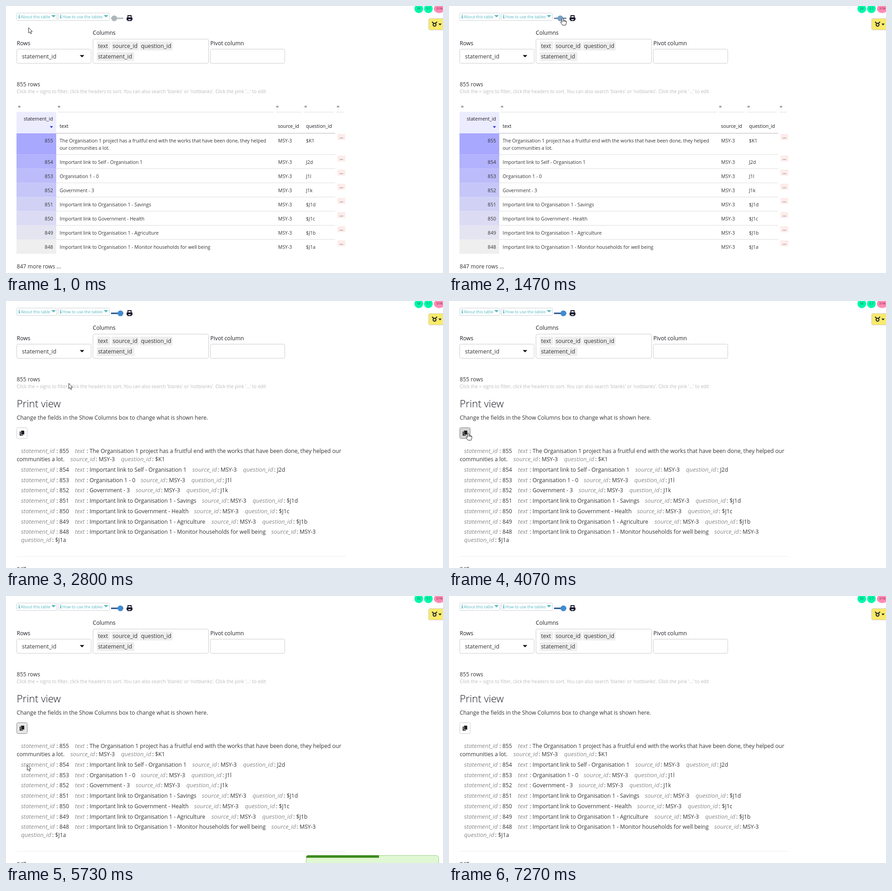
Recreate the animation shown at these times as an HTML page with a canvas. Size 957 px wide and 585 px high, loop 7.47 s.

```html
<!DOCTYPE html>
<html lang="en">
<head>
<meta charset="utf-8">
<title>Table print view</title>
<style>
html, body { margin: 0; width: 100%; height: 100%; overflow: hidden; background: #fff; }
canvas { display: block; }
</style>
</head>
<body>
<canvas id="stage" width="957" height="585"></canvas>
<script>
const ctx = document.getElementById('stage').getContext('2d');
const LOOP = 7470, STEP = 200 / 3;
const FAMILY = '"Open Sans", "Noto Sans", sans-serif';
const INK = '#343438', DARK = '#1e1e26', TEAL = '#55b9c3';

// id, text, question
const ROWS = [
  [855, 'The Organisation 1 project has a fruitful end with the works that have been done, they helped our communities a lot.', '$K1'],
  [854, 'Important link to Self - Organisation 1', 'J2d'],
  [853, 'Organisation 1 - 0', 'J1l'],
  [852, 'Government - 3', 'J1k'],
  [851, 'Important link to Organisation 1 - Savings', '$J1d'],
  [850, 'Important link to Government - Health', '$J1c'],
  [849, 'Important link to Organisation 1 - Agriculture', '$J1b'],
  [848, 'Important link to Organisation 1 - Monitor households for well being', '$J1a']
];
const SOURCE_X = [141, 408, 295, 284, 429, 412, 450, 581];

// time, x, y of the pointer tip
const PATH = [
  [0, 49, 47], [67, 50, 49], [200, 82, 112], [330, 150, 146], [470, 228, 128],
  [600, 260, 84], [730, 252, 46], [800, 248, 33], [930, 249, 26], [2000, 249, 26],
  [2130, 320, 45], [2270, 490, 90], [2400, 605, 145], [2530, 530, 177],
  [2670, 270, 179], [2800, 137, 180], [2930, 118, 195], [3130, 72, 246],
  [3330, 47, 281], [3530, 42, 289], [5400, 42, 289], [5600, 50, 330],
  [5800, 42, 390], [6000, 22, 446], [6200, 13, 482], [6330, 16, 505],
  [6530, 27, 538], [6730, 33, 567], [6900, 36, 592], [7470, 36, 600]
];

const clamp = v => Math.max(0, Math.min(1, v));
const mix = (a, b, p) => `rgb(${a.map((v, i) => Math.round(v + (b[i] - v) * p))})`;

function text(s, x, y, size, color = INK, style = '', align = 'left') {
  ctx.font = `${style} ${size}px ${FAMILY}`;
  ctx.fillStyle = color;
  ctx.textAlign = align;
  ctx.fillText(s, x, y);
}

function rect(x, y, w, h, color) {
  ctx.fillStyle = color;
  ctx.fillRect(x, y, w, h);
}

function box(x, y, w, h, r, fill, stroke) {
  ctx.beginPath();
  ctx.roundRect(x, y, w, h, r);
  if (fill) { ctx.fillStyle = fill; ctx.fill(); }
  if (stroke) { ctx.strokeStyle = stroke; ctx.lineWidth = 1; ctx.stroke(); }
}

function ellipse(x, y, rx, ry, color) {
  ctx.beginPath();
  ctx.ellipse(x, y, rx, ry, 0, 0, Math.PI * 2);
  ctx.fillStyle = color;
  ctx.fill();
}

function poly(points, fill, stroke) {
  ctx.beginPath();
  points.forEach(([x, y]) => ctx.lineTo(x, y));
  ctx.closePath();
  ctx.fillStyle = fill;
  ctx.fill();
  if (stroke) { ctx.strokeStyle = stroke; ctx.lineWidth = 1; ctx.stroke(); }
}

const caret = (x, y, w, h, color) => poly([[x - w / 2, y], [x + w / 2, y], [x, y + h]], color);

function infoTag(label, x, w) {
  box(x + .5, 15.5, w, 16, 2, '#fff', '#ccd2d4');
  rect(x + 5, 19, 2, 2, TEAL);
  rect(x + 4, 22, 3, 1, TEAL);
  rect(x + 5, 22, 2, 5, TEAL);
  rect(x + 4, 26, 4, 1, TEAL);
  text(label, x + 9.5, 27, 8.75, TEAL);
  caret(x + w - 7, 20, 10, 5, TEAL);
}

function chip(label, x, y, w) {
  box(x, y, w, 19.5, 2, '#eee');
  text(label, x + 2.5, y + 14, 12.3);
}

function printer(x, y) {
  box(x, y + 5, 13, 6, 1.5, '#1c1c30');
  rect(x + 2, y, 9, 6, '#1c1c30');
  rect(x + 4, y + 2, 5, 3, '#fff');
  rect(x + 2, y + 8, 9, 5, '#1c1c30');
  rect(x + 4, y + 9, 5, 2, '#fff');
}

function slider(p) {
  rect(230, 25.5, 27, 3, mix([178, 186, 192], [28, 78, 138], p));
  ellipse(237 + 13.5 * p, 27, 6.3, 6.3, mix([174, 182, 188], [66, 139, 208], p));
}

function header(t) {
  infoTag('About this table', 23, 88);
  infoTag('How to use the tables', 114, 112);
  slider(clamp((t - 1270) / 400));
  printer(264, 20);

  ellipse(904, 6, 9.5, 9.5, '#00f7aa');
  ellipse(925, 6, 9.5, 9.5, '#00f7aa');
  ellipse(949, 6, 12, 9.5, '#ff8cb6');
  text('88', 904, 8, 6.5, '#285', '', 'center');
  text('9.7', 925, 8, 6.5, '#285', '', 'center');
  text('31%', 949, 8, 7, '#723', '', 'center');

  box(925.5, 27.5, 40, 25, 3, '#f9ea6b', '#ccc');
  ctx.strokeStyle = DARK;
  ctx.lineWidth = 2;
  ctx.beginPath();
  ctx.arc(938.5, 41, 3.2, 0, Math.PI * 2);
  ctx.moveTo(933, 34.5); ctx.lineTo(936.5, 38);
  ctx.moveTo(944, 34.5); ctx.lineTo(940.5, 38);
  ctx.stroke();
  caret(950.5, 38.5, 7, 4, DARK);

  text('Rows', 23.5, 86, 12.1, DARK);
  text('Columns', 190, 63, 12.1, DARK);
  text('Pivot column', 447.5, 86, 12.1, DARK);
  box(23.5, 94.5, 163, 31, 3, '#fff', '#ccc');
  box(190.5, 72.5, 253, 53, 3, '#fff', '#ccc');
  box(447.5, 94.5, 163, 31, 3, '#fff', '#ccc');
  text('statement_id', 35, 115, 12.4);
  caret(166.5, 107.5, 10, 5, '#111');
  chip('text', 199, 78, 29);
  chip('source_id', 231, 78, 60);
  chip('question_id', 293, 78, 72);
  chip('statement_id', 199, 101, 82);

  text('855 rows', 23.5, 176, 12.2);
  text("Click the = signs to filter, click the headers to sort. You can also search 'blanks' or 'notblanks'. Click the pink '...' to edit",
    23.5, 191, 10.1, '#bbb');
}

function table() {
  [[26, 0, 0], [113, 113, 473], [591, 591, 56], [653, 652, 66], [724, 724, 16]].forEach(([x, lx, w]) => {
    text('=', x, 224, 11, DARK, 'italic');
    rect(lx, 232, w, 1, '#ddd');
  });
  rect(23, 232, 87, 47, '#ececff');
  text('statement_id', 103, 251, 10.6, DARK, '', 'right');
  caret(99.5, 263.5, 7, 3.5, '#1010e0');
  text('text', 117.5, 267, 10.8, DARK);
  text('source_id', 595.5, 267, 10.5, DARK);
  text('question_id', 657, 267, 10.5, DARK);
  rect(110, 278, 611, 1.5, '#ccc');

  ROWS.forEach(([id, body, question], i) => {
    const top = i ? 295 + 31 * i : 279, h = i ? 31 : 47;
    const base = i ? top + 20 : 299;
    rect(23, top, 87, h, mix([168, 168, 255], [239, 239, 239], i / 7));
    if (i) {
      rect(23, top - 1, 87, 1, 'rgba(255,255,255,.25)');
      rect(110, top - 1, 611, 1, '#ddd');
    }
    text(id, 103, base, 10.6, '#333', '', 'right');
    const cut = i ? body.length : body.indexOf(' our') + 1;
    text(body.slice(0, cut).trim(), 117.5, base, 10.4);
    text(body.slice(cut), 117.5, base + 16, 10.4);
    text('MSY-3', 596, base, 10.4);
    text(question, 657, base, 10.4);
    rect(726, top + 1.5, 17, 13, '#fdecea');
    text('...', 734.5, top + 11, 10, DARK, '', 'center');
  });
  text('847 more rows ...', 23.5, 575, 12.1);
}

function field(name, x, y, gap, value) {
  text(name, x, y, 13.1, '#8a8a8a', 'italic');
  text(':', x + gap - 6.5, y, 12.15);
  text(value, x + gap, y, 12.15);
}

function copyButton(t) {
  const pressed = t >= 4060 && t < 4260;
  const hover = t >= 3390 && t < 5530;
  const focus = t >= 5530 && t < 7260;
  const fill = pressed ? '#d4d4d4' : hover || focus ? '#e6e6e6' : '#fff';
  const edge = pressed || focus ? '#8c8c8c' : hover ? '#adadad' : '#ccc';
  box(23.5, 277.5, 23, 24, 3, fill, edge);
  rect(30, 286, 7, 9, DARK);
  box(32.5, 283.5, 8, 9.5, .5, DARK, fill);
  poly([[38, 283], [41, 283], [41, 286]], fill);
}

function printView(t) {
  text('Print view', 23.5, 233, 22.3, '#14141f', '300');
  text('Change the fields in the Show Columns box to change what is shown here.', 23.5, 260, 12.15);
  copyButton(t);
  ROWS.forEach(([id, body, question], i) => {
    const y = i ? Math.round(351.2 + 22.72 * i) : 333;
    const cut = i ? body.length : body.indexOf('communities');
    const sx = SOURCE_X[i], sy = i ? y : 351;
    field('statement_id', 33, y, 84, id);
    field('text', 151, y, 32, body.slice(0, cut).trim());
    text(body.slice(cut), 23.5, 351, 12.15);
    field('source_id', sx, sy, 62, 'MSY-3');
    if (i < 7) field('question_id', sx + 111, sy, 74.5, question);
    else field('question_id', 33, 528, 74.5, question);
  });
  rect(23, 559, 721, 1, '#eee');
  text('847 more rows ...', 23.5, 592, 12.1);
}

function toast(t) {
  if (t < 4660 || t > 6925) return;
  const left = Math.pow(1 - clamp((t - 4666) / 770), 5);
  const x = 657 + 300 * left;
  ctx.save();
  ctx.globalAlpha = (1 - left) * (1 - clamp((t - 6640) / 280));
  box(x + .5, 568.5, 290, 60, 5, '#e0f7d3', '#9ccf84');
  ctx.beginPath();
  ctx.roundRect(x, 568, 291, 60, 5);
  ctx.clip();
  rect(x, 568, 291 * clamp((t - 4646) / 1980), 5.5, '#3c8a20');
  ctx.restore();
}

function pointerAt(t) {
  let i = PATH.findIndex(p => p[0] > t) - 1;
  if (i < 0) i = 0;
  const b = PATH[i], c = PATH[i + 1];
  const a = PATH[i - 1] || b, d = PATH[i + 2] || c;
  const u = (t - b[0]) / (c[0] - b[0]);
  return [1, 2].map(k => {
    if (b[1] === c[1] && b[2] === c[2]) return b[k];
    const m = (c[k] - a[k]) / 2, n = (d[k] - b[k]) / 2, e = c[k] - b[k];
    return b[k] + u * (m + u * (3 * e - 2 * m - n + u * (m + n - 2 * e)));
  });
}

function arrow() {
  poly([[.5, .5], [.5, 12], [3, 9.7], [5, 14], [7, 13], [5.2, 9], [8.7, 9]], '#fff', '#333');
}

function hand() {
  ctx.beginPath();
  ctx.moveTo(-1.5, 9);
  ctx.lineTo(-1.5, 1.5);
  ctx.quadraticCurveTo(0, -1, 1.5, 1.5);
  ctx.lineTo(1.5, 5.5);
  ctx.quadraticCurveTo(3, 4, 4, 6);
  ctx.quadraticCurveTo(5.5, 5, 6.2, 6.8);
  ctx.quadraticCurveTo(8, 6.2, 8.2, 8.5);
  ctx.lineTo(8, 11.5);
  ctx.lineTo(6.5, 16);
  ctx.lineTo(-.5, 16);
  ctx.lineTo(-4.5, 10);
  ctx.quadraticCurveTo(-4.5, 7.2, -1.5, 9.5);
  ctx.closePath();
  ctx.fillStyle = '#fff';
  ctx.fill();
  ctx.moveTo(1.5, 5.5); ctx.lineTo(1.5, 8.5);
  ctx.moveTo(4, 6); ctx.lineTo(4, 8.8);
  ctx.moveTo(6.2, 6.8); ctx.lineTo(6.2, 9);
  ctx.strokeStyle = '#222';
  ctx.lineWidth = 1;
  ctx.stroke();
}

function pointer(t) {
  const [x, y] = pointerAt(t);
  const linked = t >= 860 && t < 2060 || t >= 3390 && t < 5460;
  ctx.save();
  ctx.translate(Math.round(x), Math.round(y));
  linked ? hand() : arrow();
  ctx.restore();
}

function draw(now) {
  const t = Math.floor((now % LOOP + 5) / STEP) * STEP;
  rect(0, 0, 957, 585, '#fff');
  header(t);
  if (t < 1530) table();
  else printView(t);
  toast(t);
  pointer(Math.min(t, LOOP - 1));
  requestAnimationFrame(draw);
}
requestAnimationFrame(draw);
</script>
</body>
</html>
```
